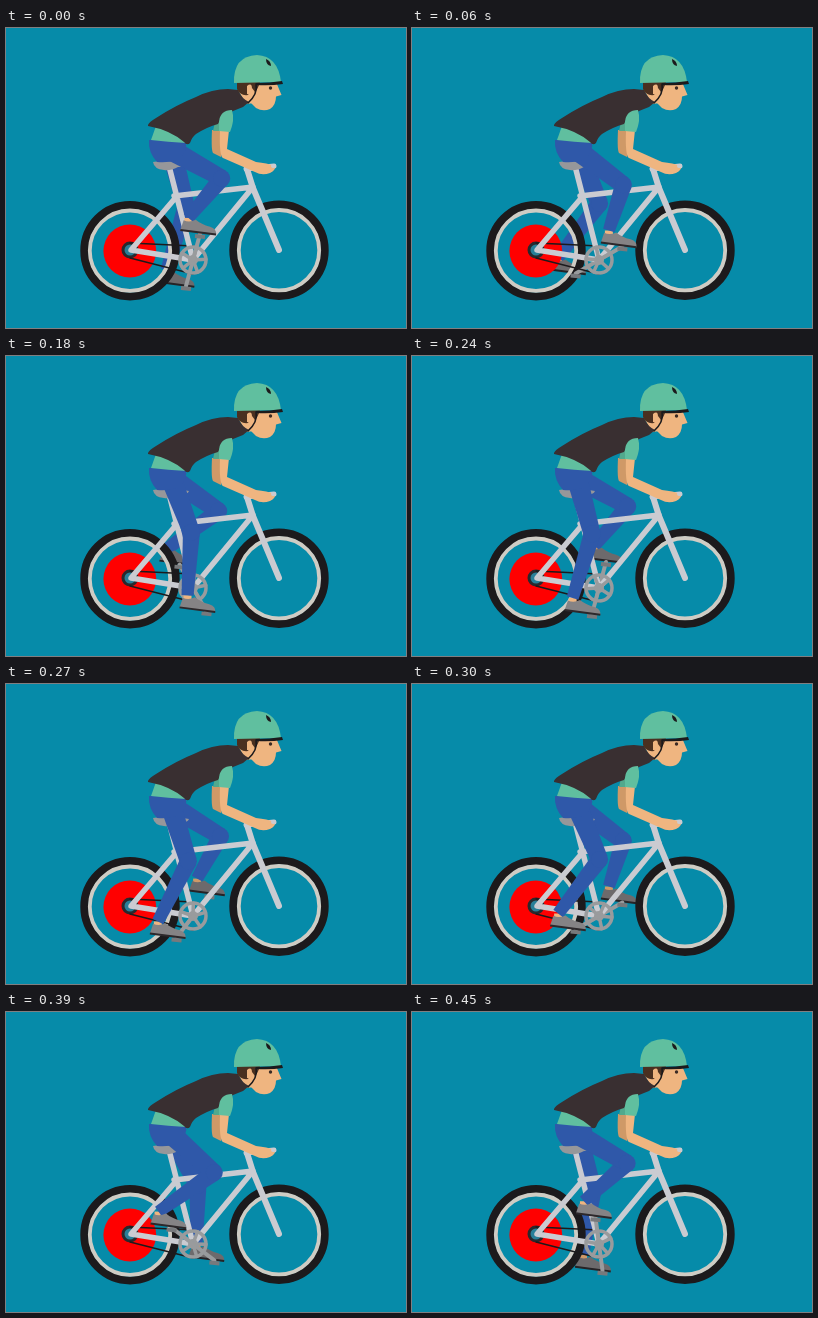
An HTML page with a canvas for the animation above (0.48 s loop, 400 px wide and 300 px high).

```html
<!DOCTYPE html>
<html lang="en">
<head>
<meta charset="utf-8">
<title>Cyclist</title>
<style>
  html, body { margin: 0; width: 100%; height: 100%; overflow: hidden; background: #068ba9; }
  canvas { display: block; }
</style>
</head>
<body>
<canvas id="stage" width="400" height="300"></canvas>
<script>
const ctx = document.getElementById('stage').getContext('2d');
const LOOP = 480, STEP = 30, TAU = Math.PI * 2, DEG = TAU / 360;
const HIP = [165, 122], AXLE = [187, 232], THIGH = 58, CRANK = 27, CRANK_START = -75 * DEG;
const BG = '#068ba9', DARK = '#1c1a1c', METAL = '#cacbd1', GEAR = '#999b9d', TROUSERS = '#2f58a9',
      SKIN = '#efb580', SKIN_SHADE = '#cf9967', GREEN = '#60bf9f', VEST = '#392f31';
const NEAR = { shoe: '#858385', sole: '#2d282b', skin: SKIN };
const FAR = { shoe: '#6d6a6c', sole: '#262326', skin: SKIN_SHADE };

const polar = ([x, y], r, a) => [x + r * Math.cos(a), y + r * Math.sin(a)];

function fill(d, color) {
  ctx.fillStyle = color;
  ctx.fill(new Path2D(d));
}
function stroke(d, color, width, cap = 'round') {
  ctx.strokeStyle = color;
  ctx.lineWidth = width;
  ctx.lineCap = cap;
  ctx.lineJoin = 'round';
  ctx.stroke(new Path2D(d));
}
function line(p, q, color, width, cap) {
  stroke(`M${p}L${q}`, color, width, cap);
}
function disc([x, y], r, color) {
  ctx.fillStyle = color;
  ctx.beginPath();
  ctx.arc(x, y, r, 0, TAU);
  ctx.fill();
}
function ring([x, y], r, color, width) {
  ctx.strokeStyle = color;
  ctx.lineWidth = width;
  ctx.beginPath();
  ctx.arc(x, y, r, 0, TAU);
  ctx.stroke();
}
// Tapered segment between two points
function limb(p, q, w1, w2, color) {
  const side = Math.atan2(q[1] - p[1], q[0] - p[0]) + Math.PI / 2;
  const corners = [polar(p, w1 / 2, side), polar(q, w2 / 2, side),
                   polar(q, -w2 / 2, side), polar(p, -w1 / 2, side)];
  fill(`M${corners.join('L')}Z`, color);
}

// Pose of one leg, with the turn counted from the top of the pedal stroke
function pose(turn) {
  const angle = turn + CRANK_START;
  const pedal = polar(AXLE, CRANK, angle);
  const heel = [pedal[0] - 23.5 - 4 * Math.sin(angle), pedal[1] - 4];
  const knee = polar(HIP, THIGH, (52 - 23 * Math.cos(turn + 0.07)) * DEG);
  return { pedal, heel, knee, ankle: [heel[0] + 8, heel[1] - 12] };
}
function drawCrank({ pedal }) {
  line(AXLE, pedal, GEAR, 4);
  line([pedal[0] - 5, pedal[1] + 2], [pedal[0] + 5, pedal[1] + 3], '#77797c', 4, 'butt');
}
function drawLeg({ heel, knee, ankle }, look) {
  line(ankle, [heel[0] + 8, heel[1] - 5], look.skin, 8, 'butt');
  limb(knee, ankle, 17, 12, TROUSERS);
  limb(HIP, knee, 21, 17, TROUSERS);
  disc(knee, 8.5, TROUSERS);
  ctx.save();
  ctx.translate(...heel);
  ctx.rotate(0.13);
  fill('M0 0L2-10Q8-8 14-12Q20-8 29-7Q36-6 36 0Z', look.shoe);
  stroke('M0 0H36', look.sole, 2, 'butt');
  ctx.restore();
}

function drawWheels() {
  for (const hub of [[124, 222.7], [273, 222.2]]) {
    ring(hub, 45.7, DARK, 8);
    ring(hub, 40.2, '#cfccc4', 3.8);
  }
  disc([123.8, 223], 26.4, '#ff0000');
  disc([124, 222], 8.5, '#29292d');
  disc([124, 222], 5.5, '#287f98');
}
function drawFrame(turn) {
  stroke('M124 215L187 218M124 230L187 246', DARK, 1.3);
  stroke('M163 138L187 232L125 222L171 168M168 168L247 159L187 232', METAL, 5.5);
  stroke('M241 141L247 160L273 222', METAL, 6);
  stroke('M240 141L268 138', METAL, 5);
  fill('M147 134Q164 131 183 135Q182 139 172 139Q164 143 158 142Q148 141 147 134Z', '#96979a');
  ring(AXLE, 13, GEAR, 3.5);
  for (let i = 0; i < 5; i++) line(AXLE, polar(AXLE, 13, turn + CRANK_START + i * TAU / 5), GEAR, 3.5);
  disc(AXLE, 5, GEAR);
}
function drawBody() {
  fill('M143 112L180 113Q182 124 172 132Q162 135 151 134Q142 124 143 112Z', TROUSERS);
  fill('M150 98L145 112Q162 114 180 115L182 108Z', GREEN);
  // Arms
  fill('M206 102H215V129L207 125Q205 122 206 102Z', SKIN_SHADE);
  fill('M214 102H223L221 121L250 134Q261 135 269 138Q270 142 264 145Q256 148 249 144L217 130Q213 128 214 102Z', SKIN);
  stroke('M267 138H268', METAL, 4);
  fill('M209 94L215 92V103H207Z', '#52a98d');
  // Neck and vest
  fill('M232 62L246 62L248 75L240 76Z', SKIN);
  fill('M142 97Q143 94 150 90Q170 77 190 69Q206 61 222 61L232 62Q236 71 243 74L237 79L227 83L214 92L212 96Q201 99 190 106Q186 109 184 115Q181 118 178 114Q164 102 142 98Z', VEST);
  fill('M213 94Q214 82 226 82Q229 92 224 104L213 103Z', GREEN);
}
function drawHead() {
  fill('M243 55H270.5L275.5 67L270 68.5Q270 77 264 81Q257 84 250 80L242 72Z', SKIN);
  fill('M231 54H254Q252 61 249 64L246 60L242 67Q234 68 231 61Z', '#4a3020');
  fill('M241 58Q246 54 246 61Q245 67 241 66Z', SKIN);
  stroke('M250 56Q252 66 242 75', DARK, 1.6);
  disc([264.5, 60], 1.7, '#3b2a24');
  fill('M228 55Q227 28 251 27Q272 28 275 54Z', GREEN);
  fill('M250 55Q264 55 276 53L277 56Q264 58 250 57Z', DARK);
  fill('M260 31Q265 33 265 38Q260 37 260 31Z', DARK);
}

function draw() {
  const time = Math.floor(performance.now() % LOOP / STEP) * STEP;
  const turn = TAU * time / LOOP;
  const near = pose(turn), far = pose(turn + Math.PI);
  ctx.fillStyle = BG;
  ctx.fillRect(0, 0, 400, 300);
  drawLeg(far, FAR);
  drawWheels();
  drawCrank(far);
  drawFrame(turn);
  drawCrank(near);
  drawLeg(near, NEAR);
  drawBody();
  drawHead();
  requestAnimationFrame(draw);
}
draw();
</script>
</body>
</html>
```
